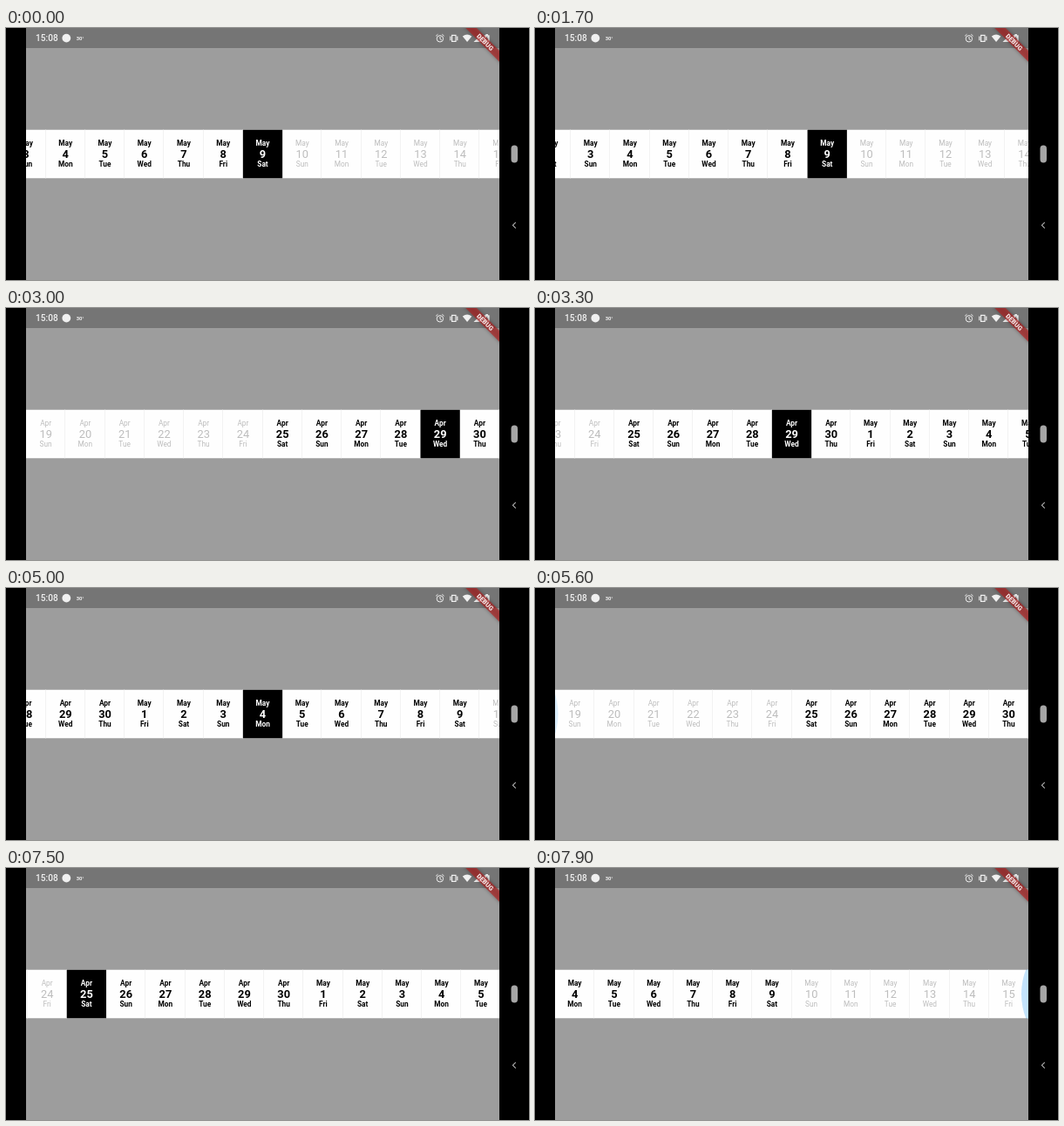
Animation of 600x289 px, one loop 8000 ms. Source, as an HTML page with a canvas:

```html
<!DOCTYPE html>
<html lang="en">
<head>
<meta charset="utf-8">
<title>Date strip</title>
<style>
  html, body { margin: 0; width: 100%; height: 100%; overflow: hidden; background: #000; }
  canvas { display: block; }
</style>
</head>
<body>
<canvas id="stage" width="600" height="289"></canvas>
<script>
const ctx = document.getElementById('stage').getContext('2d');
const LOOP = 8000, STEP = 100;
const LEFT = 23, RIGHT = 566, CELL = (RIGHT - LEFT) / 12;
const TOP = 116.5, BOTTOM = 172.5;
const DAYS = ['Sun', 'Mon', 'Tue', 'Wed', 'Thu', 'Fri', 'Sat'];
const COUNT = 27, FIRST_ACTIVE = 6, LAST_ACTIVE = 20;

// [time, scroll in cells]
const SCROLL = [
  [1600, 14.5], [1700, 13.6], [1900, 3], [2000, 0],
  [3000, 0], [3100, 1.4], [3200, 3.4], [3300, 4.5],
  [4200, 4.5], [4300, 5.4], [4400, 8], [4500, 9.5],
  [5100, 9.5], [5200, 8.9], [5300, 5.6], [5400, 1.8], [5500, 0],
  [6300, 0], [6600, 0.5],
  [7300, 0.5], [7400, 1.2], [7700, 12.5], [7800, 15]
];
// [time, reach of the edge glow in px]
const GLOW_LEFT = [[1900, 0], [2000, 10], [2200, 9], [2500, 0], [5400, 0], [5500, 5], [5600, 3.5], [5800, 0]];
const GLOW_RIGHT = [[7700, 0], [7800, 4], [7900, 8]];
// [time, tapped day]
const PICKS = [[0, 20], [3000, 10], [4300, 15], [6300, 6]];

function at(keys, t) {
  if (t <= keys[0][0]) return keys[0][1];
  for (let i = 1; i < keys.length; i++) {
    const [t0, a] = keys[i - 1], [t1, b] = keys[i];
    if (t <= t1) return a + (b - a) * (t - t0) / (t1 - t0);
  }
  return keys[keys.length - 1][1];
}

function rect(color, x, y, w, h) {
  ctx.fillStyle = color;
  ctx.fillRect(x, y, w, h);
}

function text(str, x, y, size, weight, color, align = 'center') {
  ctx.font = `${weight} ${size}px Roboto, sans-serif`;
  ctx.textAlign = align;
  ctx.fillStyle = color;
  ctx.fillText(str, x, y);
}

function fill(path, color) {
  ctx.fillStyle = color;
  ctx.fill(new Path2D(path));
}

function line(path, color, width) {
  ctx.strokeStyle = color;
  ctx.lineWidth = width;
  ctx.stroke(new Path2D(path));
}

function disc(x, y, r, color) {
  ctx.fillStyle = color;
  ctx.beginPath();
  ctx.arc(x, y, r, 0, 7);
  ctx.fill();
}

function drawCell(i, x, picked) {
  const active = i >= FIRST_ACTIVE && i <= LAST_ACTIVE;
  const april = i < 12;
  const color = picked ? '#fff' : active ? '#000' : '#bdbdbd';
  const weight = active ? 700 : 400;
  const mid = x + CELL / 2;
  if (picked) rect('#000', x, TOP, CELL, BOTTOM - TOP);
  else rect('#f2f2f2', Math.round(x + CELL) - 1, TOP, 1, BOTTOM - TOP);
  text(april ? 'Apr' : 'May', mid, 135, 8.3, weight, color);
  text(april ? 19 + i : i - 11, mid, 149.2, 12.8, weight, color);
  text(DAYS[i % 7], mid, 159.4, 8.3, weight, color);
}

function drawGlow(reach, edge, dir) {
  if (reach > 0) disc(edge + dir * (reach - 78), 144.5, 78, `rgba(33,150,243,${Math.min(0.32, 0.08 + reach * 0.024)})`);
}

function drawStrip(t) {
  const scroll = at(SCROLL, t);
  const pick = PICKS.filter(p => p[0] <= t).pop()[1];
  ctx.save();
  ctx.beginPath();
  ctx.rect(LEFT, TOP, RIGHT - LEFT, BOTTOM - TOP);
  ctx.clip();
  rect('#fefefe', LEFT, TOP, RIGHT - LEFT, BOTTOM - TOP);
  for (let i = 0; i < COUNT; i++) {
    const x = LEFT + (i - scroll) * CELL;
    if (x > LEFT - CELL && x < RIGHT) drawCell(i, x, i === pick);
  }
  drawGlow(at(GLOW_LEFT, t), LEFT, 1);
  drawGlow(at(GLOW_RIGHT, t), RIGHT, -1);
  ctx.restore();
}

function drawStatusBar() {
  const ink = '#f0f0f0';
  rect('#757575', LEFT, 0, RIGHT - LEFT, 23);
  text('15:08', 34, 15.4, 10.1, 500, ink, 'left');
  disc(69.3, 11.6, 4.9, ink);
  text('30°', 80.7, 13.7, 5.8, 700, ink, 'left');
  // alarm clock
  line('M494.2 12.3a3.7 3.7 0 1 0 7.4 0a3.7 3.7 0 1 0 -7.4 0M498 10v2.6l1.8 1.2M493.2 9.2l2.3-2M502.6 9.2l-2.3-2', ink, 1);
  // vibrating phone
  line('M511.6 8.4h4.4v7h-4.4zM509.8 9.6v4.6M517.8 9.6v4.6', ink, 1.2);
  // wifi, signal, battery
  fill('M523.8 9.4Q529 5.6 534.4 9.4L529.1 16z', ink);
  fill('M536.5 16L545.2 7.4V16z', ink);
  fill('M548.6 8.2h1.7V7h2.6v1.2h1.7V16.4h-6z', ink);
  fill('M552.2 9l-2.4 3.7h1.5v2.9l2.3-3.8h-1.4z', '#757575');
}

function drawBanner() {
  ctx.save();
  ctx.beginPath();
  ctx.rect(LEFT, 0, RIGHT - LEFT, 289);
  ctx.clip();
  ctx.translate(549.8, 16.2);
  ctx.rotate(Math.PI / 4);
  ctx.shadowColor = 'rgba(0,0,0,.5)';
  ctx.shadowBlur = 4;
  rect('rgba(183,28,28,.63)', -30, -4.5, 60, 9);
  ctx.shadowColor = 'transparent';
  text('DEBUG', 0, 2.7, 7.4, 900, '#f4e4e4');
  ctx.restore();
}

function draw(t) {
  rect('#000', 0, 0, 600, 289);
  rect('#9d9d9d', LEFT, 0, RIGHT - LEFT, 289);
  drawStatusBar();
  drawStrip(t);
  drawBanner();
  ctx.fillStyle = '#a6a6a6';
  ctx.beginPath();
  ctx.roundRect(579.5, 134.5, 7.5, 20, 3.75);
  ctx.fill();
  line('M584.8 222.8L581.4 226.2L584.8 229.6', '#b0b0b0', 1.1);
}

const start = performance.now();
function tick() {
  const t = (performance.now() - start) % LOOP;
  draw(Math.floor(t / STEP) * STEP);
  requestAnimationFrame(tick);
}
tick();
</script>
</body>
</html>
```
